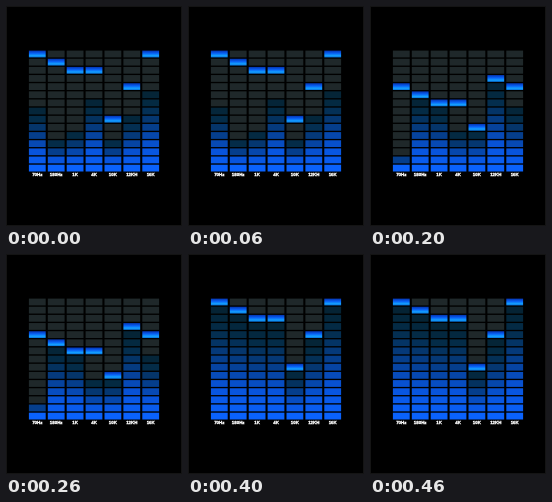
An HTML page for the animation above (500 ms loop, 176 px wide and 220 px high).

```html
<!DOCTYPE html>
<html lang="en">
<head>
<meta charset="utf-8">
<title>Equalizer</title>
<style>
  html, body { margin: 0; width: 100%; height: 100%; overflow: hidden; background: #000; }
  svg { display: block; width: 100vw; height: 100vh; }
  text {
    font: bold 4.4px "Liberation Sans", Arial, sans-serif;
    fill: #fff; stroke: #fff; stroke-width: .35px; text-anchor: middle;
  }
</style>
</head>
<body>
<svg id="stage" viewBox="0 0 176 220">
  <defs>
    <linearGradient id="peak" x1="0" y1="0" x2="0" y2="1">
      <stop offset="0" stop-color="#0434b0"/>
      <stop offset=".4" stop-color="#0860f4"/>
      <stop offset=".75" stop-color="#14a0ff"/>
      <stop offset="1" stop-color="#0870d8"/>
    </linearGradient>
    <filter id="soft" x="-5%" y="-5%" width="110%" height="110%" color-interpolation-filters="sRGB">
      <feGaussianBlur stdDeviation=".45"/>
    </filter>
  </defs>
  <rect width="176" height="220" fill="#000"/>
  <rect x=".5" y=".5" width="175" height="219" fill="none" stroke="#141414"/>
  <g id="panel" filter="url(#soft)"></g>
</svg>
<script>
const NS = "http://www.w3.org/2000/svg";
const panel = document.getElementById("panel");
const ROWS = 15, STEP = 100;
const LEFT = 22.9, TOP = 44.6, COL = 18.9, ROW = 8.15, W = 16.8, H = 6.8;
const labels = ["70Hz", "180Hz", "1K", "4K", "10K", "12KH", "16K"];

// Lit cells per band, counted from the bottom
const levels = [
  [8, 4, 5, 9, 4, 7, 10],
  [1, 3, 4, 1, 2, 3, 6],
  [2, 9, 8, 5, 5, 11, 8],
  [2, 7, 3, 4, 3, 2, 5],
  [14, 13, 12, 12, 6, 10, 14]
];

// Row of each peak marker, counted from the top
const high = [0, 1, 2, 2, 8, 4, 0];
const peaks = [
  high,
  high,
  [4, 5, 6, 6, 9, 3, 4],
  [6, 7, 8, 8, 9, 3, 6],
  high
];

// Bar colours at equal distances from tip to foot
const ramp = [[5, 32, 44], [4, 44, 72], [5, 62, 140], [8, 84, 220], [10, 98, 252]];

function add(tag, attrs) {
  const el = document.createElementNS(NS, tag);
  for (const key in attrs) el.setAttribute(key, attrs[key]);
  return panel.appendChild(el);
}

function litColor(t) {
  const pos = t * (ramp.length - 1);
  const i = Math.min(ramp.length - 2, Math.floor(pos));
  const c = ramp[i].map((v, k) => Math.round(v + (ramp[i + 1][k] - v) * (pos - i)));
  return `rgb(${c})`;
}

const cells = labels.map((name, i) => {
  const x = LEFT + i * COL;
  const label = add("text", { x: x + W / 2, y: 169.7 });
  label.textContent = name;
  return Array.from({ length: ROWS }, (_, r) =>
    add("rect", { x, y: TOP + r * ROW, width: W, height: H }));
});

function draw(ms) {
  const step = Math.floor(ms / STEP) % levels.length;
  cells.forEach((band, i) => {
    const level = levels[step][i];
    const first = ROWS - level;
    band.forEach((cell, r) => {
      const fill = r === peaks[step][i] ? "url(#peak)"
        : r >= first ? litColor((r - first + 1) / level)
        : "#1f282a";
      cell.setAttribute("fill", fill);
    });
  });
}

const start = performance.now();
function tick() {
  draw(performance.now() - start);
  requestAnimationFrame(tick);
}
draw(0);
requestAnimationFrame(tick);
</script>
</body>
</html>
```
